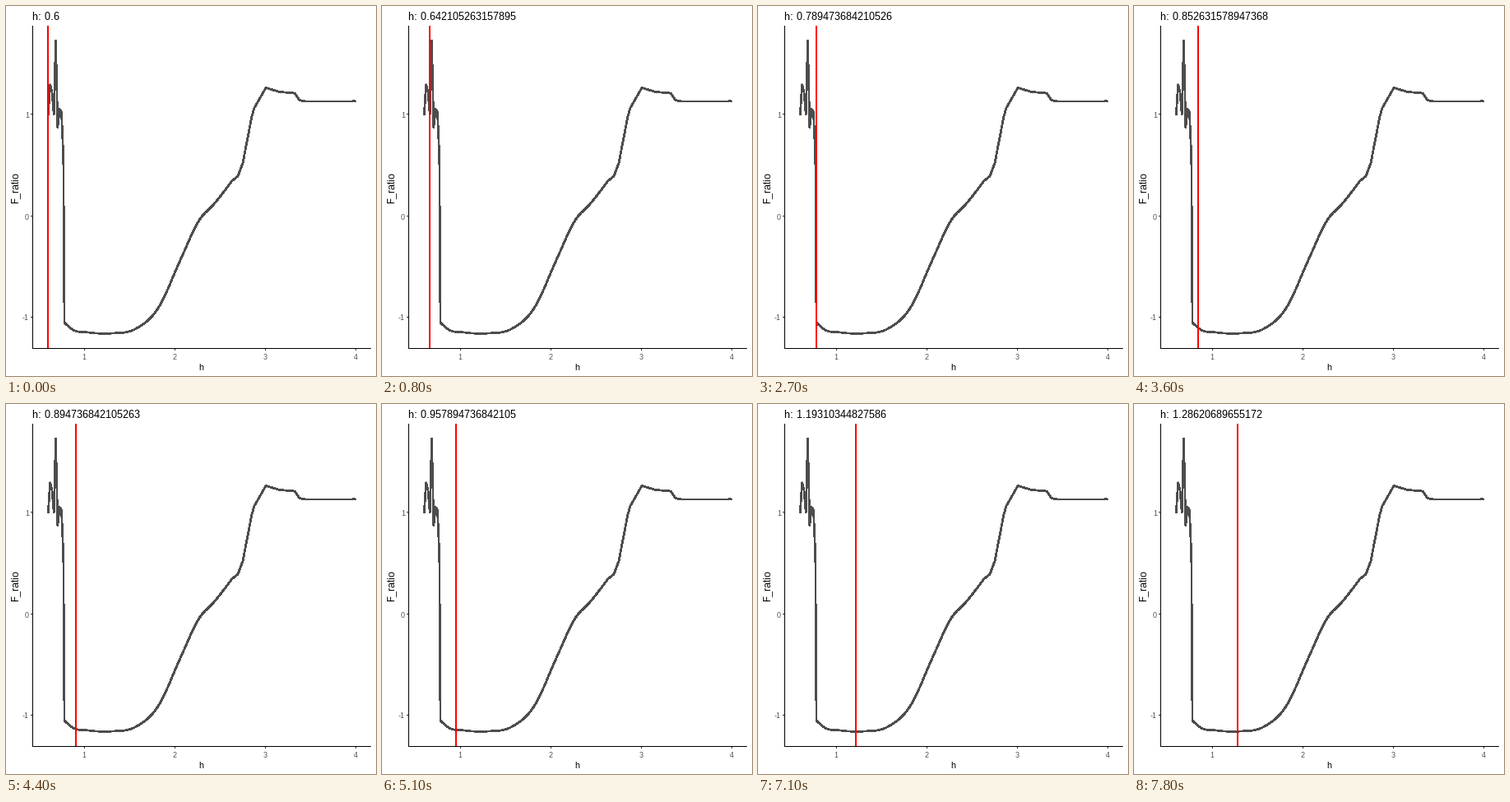
Animation of 450x450 px, one loop 8 s. Source, as a matplotlib script:

```python
import math

import matplotlib.pyplot as plt
import numpy as np
from matplotlib.animation import FuncAnimation

plt.rcParams["font.family"] = "Liberation Sans"
plt.rcParams["text.hinting"] = "native"
plt.rcParams["text.hinting_factor"] = 1

SIZE = 450
TICKS = 80          # 100 ms each
PER_STATE = 3       # ticks spent on every value of h
LEFT, RIGHT, TOP, BOTTOM = 32, 444, 24, 416
GREY = "#4D4D4D"

# At 72 dpi one point is one pixel, so all sizes below are pixels.
fig = plt.figure(figsize=(SIZE / 72, SIZE / 72), dpi=72, facecolor="white")
ax = fig.add_axes([0, 0, 1, 1])
ax.set_xlim(0, SIZE)
ax.set_ylim(SIZE, 0)
ax.axis("off")


def h_value(i):
    """Value of h for state i: a fine sweep to 1, then a coarser one."""
    if i < 20:
        return 0.6 + i * 0.4 / 19
    return 1.1 + (i - 20) * 0.9 / 29


def x_pixel(h):
    return 51.05 + (h - 0.6) * 110.16


def y_pixel(ratio):
    return 255 - 123.5 * ratio


def smooth(keys, step=3):
    """Cubic Hermite curve through the key points."""
    kx, ky = np.array(keys, float).T
    slope = np.gradient(ky, kx)
    x = np.arange(kx[0], kx[-1] + 1, step)
    i = np.clip(np.searchsorted(kx, x, side="right") - 1, 0, len(kx) - 2)
    w = kx[i + 1] - kx[i]
    t = (x - kx[i]) / w
    rise = t * t * (3 - 2 * t)
    y = (ky[i] + (ky[i + 1] - ky[i]) * rise
         + w * t * (1 - t) * ((1 - t) * slope[i] - t * slope[i + 1]))
    return list(zip(x, y))


def stroke(xs, ys, color, width, z):
    return ax.plot(xs, ys, color=color, lw=width, antialiased=False, zorder=z,
                   snap=False, solid_capstyle="butt",
                   solid_joinstyle="round")[0]


def label(x, y, text, size, color="black", ha="left", va="baseline", turn=0):
    return ax.text(x, y, text, fontsize=size, color=color, ha=ha, va=va,
                   rotation=turn)


# Curve: jagged start (one value per state), smooth dip and rise, then steps.
jagged = [0.99, 1.29, 1.22, 1.0, 1.72, 0.87, 1.05, 1.02, 0.57]
dip = [(71, 385), (80, 393), (100, 397), (130, 398), (156, 393.5), (186, 366),
       (212, 309), (236, 259), (252, 242), (277, 210)]
steps = [(282, 207), (288, 191), (299, 134), (302, 124), (316, 99.5),
         (333, 104.5), (351, 106), (357, 114.5), (364, 116), (420, 116),
         (425, 115.4)]
curve = [(x_pixel(h_value(i)) + 0.2, y_pixel(r)) for i, r in enumerate(jagged)]
stroke(*zip(*curve, *smooth(dip), *steps), GREY, 1.7, 1)

# Axes
stroke([LEFT + 0.5] * 2, [TOP, BOTTOM + 1], "black", 1, 3)
stroke([LEFT, RIGHT], [BOTTOM + 0.5] * 2, "black", 1, 3)
for n in range(1, 5):
    x = math.floor(x_pixel(n)) + 0.5
    stroke([x, x], [BOTTOM + 1, BOTTOM + 3], "#333333", 1, 3)
    label(x - 0.5, 430, str(n), 9, GREY, "center")
for n in (-1, 0, 1):
    y = math.floor(y_pixel(n)) + 0.5
    stroke([LEFT - 2, LEFT], [y, y], "#333333", 1, 3)
    label(28, y + 4, str(n), 9, GREY, "right")

label(237, 443, "h", 11, ha="center")
label(11.5, 220.5, "F_ratio", 11.6, ha="center", va="center", turn=90)

marker = stroke([51, 51], [TOP, BOTTOM], "red", 2, 2)
title = label(32, 17, "", 13)


def draw(tick):
    state, step = divmod(tick, PER_STATE)
    # The marker jumps one tick before the title follows.
    shown = state + (step == PER_STATE - 1)
    x = math.floor(x_pixel(h_value(shown)))
    marker.set_xdata([x, x])
    title.set_text(f"h: {h_value(state):.15g}")
    return marker, title


anim = FuncAnimation(fig, draw, frames=TICKS, interval=100, repeat=True,
                     repeat_delay=0, blit=False)
plt.show()
```
